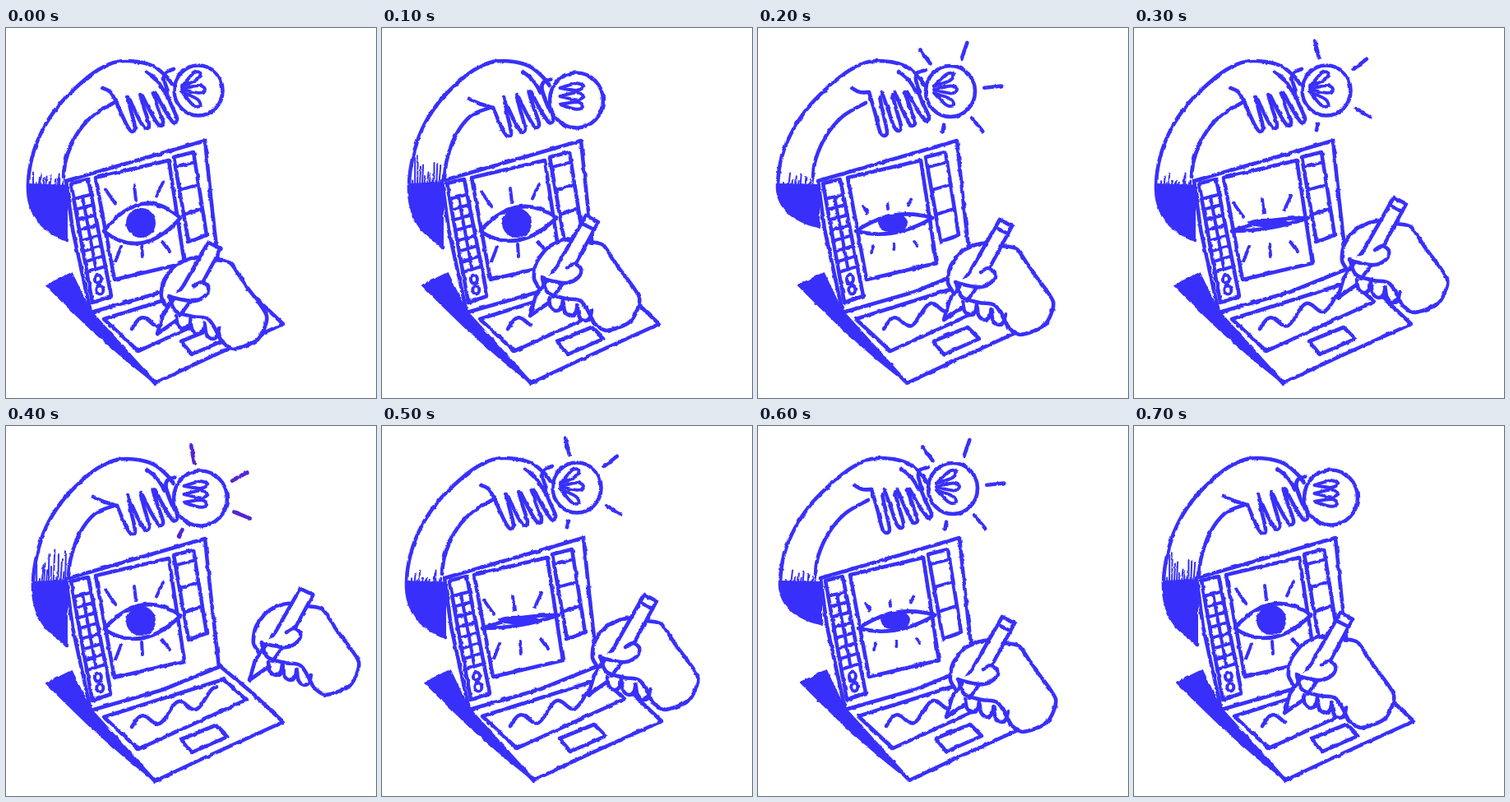
Recreate the animation shown at these times as an HTML page. Size 450 px wide and 450 px high, loop 800 ms.

```html
<!DOCTYPE html>
<html lang="en">
<head>
<meta charset="utf-8">
<title>Drawing an idea</title>
<style>
html, body { margin: 0; width: 100%; height: 100%; overflow: hidden; background: #fff; }
svg { display: block; width: 100vw; height: 100vh; }
path { fill: none; stroke: #3830fa; stroke-width: 4.6; stroke-linecap: round; stroke-linejoin: round; }
.thin { stroke-width: 4; }
.paper { fill: #fff; }
.ink { fill: #3830fa; stroke-width: 2; }
.violet { stroke: #5526d2; }
.cel { visibility: hidden; animation: show 800ms step-end infinite; }
@keyframes show {
  0% { visibility: visible; }
  12.5%, 100% { visibility: hidden; }
}
</style>
</head>
<body>
<svg id="stage" viewBox="0 0 450 450"></svg>
<script>
const r1 = n => Math.round(n * 10) / 10;
const mix = (a, b, t) => a.map((v, i) => v + (b[i] - v) * t);
const add = (p, x, y) => [p[0] + x, p[1] + y];
const pts = text => text.split(',').map(s => s.trim().split(' ').map(Number));
const polar = ([x, y], deg, r) => {
  const t = deg * Math.PI / 180;
  return [x + r * Math.cos(t), y + r * Math.sin(t)];
};
const path = (d, cls = '') => `<path class="${cls}" d="${d}"/>`;
const line = (p, cls, close = '') => path('M' + p.map(q => q.map(r1)).join('L') + close, cls);
const shape = (p, cls) => line(p, cls, 'Z');

// Smooth open stroke through the points
function curve(p, cls, pull = 1 / 6) {
  const at = i => p[Math.max(0, Math.min(p.length - 1, i))];
  let d = 'M' + p[0].map(r1);
  for (let i = 0; i < p.length - 1; i++) {
    const [a, b, c, e] = [at(i - 1), at(i), at(i + 1), at(i + 2)];
    const c1 = b.map((v, k) => v + (c[k] - a[k]) * pull);
    const c2 = c.map((v, k) => v - (e[k] - b[k]) * pull);
    d += 'C' + [...c1, ...c2, ...c].map(r1);
  }
  return path(d, cls);
}

const oval = ([x, y], rx, ry, cls) =>
  path(`M${x - rx} ${y}a${rx} ${ry} 0 1 1 ${2 * rx} 0a${rx} ${ry} 0 1 1 ${-2 * rx} 0Z`, cls);

function random(seed) {
  return () => (seed = seed * 16807 % 2147483647) / 2147483647;
}

// lean and foot bend the arm; stack and fan arrange the filament loops
const poses = [
  { id: 'a', lean: 0, foot: 258, wrist: [117, 73], knuckle: 92, reach: 126, slope: 3.6, dark: 192, hatch: 18,
    bulb: [234, 76], r: 30, stack: 3, fan: 38, rays: [-103, -38, 31, 104] },
  { id: 'c', lean: 6, foot: 267, wrist: [106, 86], knuckle: 97, reach: 132, slope: 5.5, dark: 188, hatch: 45,
    bulb: [236.5, 88], r: 33, stack: 10, fan: 4, rays: [-100, -29, 22, 120] },
  { id: 'b', lean: -3, foot: 241, wrist: [114, 73], knuckle: 78, reach: 131, slope: 6, dark: 191, hatch: 16,
    bulb: [234, 77], r: 30.5, stack: 4, fan: 32, rays: [-126, -71, -6, 51, 101] }
];
const openness = [1, .85, .45, .18, .85];
const penTips = [[184, 372], [180, 350], [226, 355], [248, 328], [296, 309]];

const outer = pts('203 70,195 59,180 47,160 41,135 41,112 51,90 68,65 93,45 123,32 156,27 190,30 215,42 237,60 251,74 258');
const inner = pts('70 181,73 160,85 131,105 107,134 92');

function arm(pose, rnd) {
  const bend = ([x, y]) => [
    x + pose.lean * Math.max(0, Math.min(1, (y - 60) / 100)) * (x < 70 || y < 190 ? 1 : 0),
    y > 190 ? 190 + (y - 190) * (pose.foot - 190) / 68 : y
  ];
  const edge = outer.map(bend);
  let s = shape([...edge.slice(-5), [74, pose.dark]], 'ink');
  for (let i = 0; i < 13; i++) {
    const x = 33 + pose.lean * .7 + i * 2.9;
    s += line([[x, pose.dark + 6], [x + 3 * rnd(), pose.dark - pose.hatch * rnd()]], 'ink');
  }
  const sleeve = inner.slice(0, -1).map(bend);
  s += curve(edge) + curve([...sleeve, [131, pose.knuckle > 95 ? 97 : 91]]);
  s += curve([pose.wrist, [pose.wrist[0] + 10, pose.wrist[1] + 5], [135, pose.knuckle]]);
  for (let i = 0; i < 4; i++) {
    const a = [135 + 15.5 * i, 78 + (pose.knuckle - 78) * (1 - i / 3)];
    const b = [148 + 15.3 * i, 84 - 3 * i];
    const tip = [153 + 17 * i, pose.reach - pose.slope * i];
    s += curve([a, add(mix(a, tip, .5), -1, 1), add(tip, -5, -6), tip, add(tip, 4, -5), add(mix(b, tip, .4), 2, 0), b]);
  }
  return s + curve(pts('171 53,183 63,193 78'));
}

function bulb({ bulb: c, r, stack, fan }) {
  let s = curve([[-30, -26], [-40, -22], [-42, -14], [-37, 1]].map(([x, y]) => add(c, x, y)));
  s += oval(c, r - .5, r + .5, 'paper');
  for (const j of [-1, 0, 1]) {
    const root = add(c, -20, j * stack - stack / 2);
    const petal = [-12, 12].map(turn => polar(root, j * fan + turn, 21));
    s += curve([root, petal[0], polar(root, j * fan, 28), petal[1], root], 'thin');
  }
  return s;
}

const rays = ({ id, bulb: c, r, rays }) => rays.map((deg, i) =>
  line([polar(c, deg, r + 11), polar(c, deg, r + (i < rays.length - 1 ? 32 : 20))], id === 'c' ? 'violet' : '')).join('');

const panel = pts('109 182,198 161,217 286,132 306');
const tools = pts('79 189,100 184,128 326,105 334');
const swatches = pts('204 157,228 151,244 252,222 260');
const spot = (q, u, v) => mix(mix(q[0], q[1], u), mix(q[3], q[2], u), v);
const rung = (q, v) => line([spot(q, 0, v), spot(q, 1, v)], 'thin');

function laptop() {
  let s = shape(pts('49 313,80 298,103 346,181 432,145 403,105 368,70 334'), 'ink');
  s += shape(pts('103 346,181 432,238 405,337 360,300 325,259 291'), 'paper');
  s += shape(pts('73 186,242 137,249 205,259 293,190 321,103 346,81 245'), 'paper');
  s += shape(panel) + shape(tools) + shape(swatches);
  for (let i = 0; i < 8; i++) s += rung(tools, .13 + i * .088);
  s += line([spot(tools, .5, .13), spot(tools, .5, .746)], 'thin');
  for (const v of [.83, .92]) s += oval(spot(tools, .5, v).map(r1), 4, 5, 'thin');
  for (const v of [.12, .39, .68]) s += rung(swatches, v);
  return s + shape(pts('119 354,265 308,292 333,161 393')) + shape(pts('213 381,255 364,269 378,226 397'));
}

function eye(open) {
  const lift = 50 * open;
  let s = path(`M119 247Q165 ${239 - lift} 212 231Q165 ${239 + lift * .9} 119 247Z`, 'paper');
  s += oval([164, 237], open < .3 ? 24 : 17, Math.min(17, 23 * open), 'ink');
  const len = Math.min(1, .4 + Math.abs(open - .45) * 2.4); // lashes shrink halfway through a blink
  for (const j of [-1, 0, 1]) {
    const top = [158 + 25 * j, 209 - 4.5 * j + 20 * (1 - open)];
    const low = [165 + 25 * j, 263 - 3 * j];
    s += line([top, add(top, (10 * j - 2) * len, -17 * len)], 'thin');
    s += line([low, add(low, (8 * j + 1) * len, (15 - 3 * j) * len)], 'thin');
  }
  return s;
}

// The scribble grows until it meets the pen
function scribble(tip) {
  const end = Math.min(1, (tip[0] - 153) / 103);
  const p = [];
  for (let i = 0; i <= 24; i++) {
    const s = end * i / 24;
    p.push([153 + 103 * s, 366 - 40 * s - 9 * Math.sin(2 * Math.PI * 2.3 * s)]);
  }
  return curve(p);
}

function hand(tip, longPen) {
  const put = text => pts(text).map(p => add(p, ...tip));
  const grip = put('32 -59,50 -53');
  const top = put('68 -122,83 -114').map((p, i) => mix(grip[i], p, longPen ? 1 : .83));
  let s = curve(put('14 -30,5 -45,8 -65,23 -84,46 -93,70 -90,89 -86,106 -61,133 -22,122 7,93 18,78 9'), 'paper', .12);
  s += shape([top[0], top[1], grip[1], ...put('23 -16,0 0,7 -24'), grip[0]], 'paper');
  if (longPen) s += line(top.map((p, i) => mix(p, grip[i], .15)));
  for (let i = 0; i < 3; i++) {
    const p = add(tip, 23 + 17.5 * i, 6 * i - 22);
    s += curve([p, add(p, 2, 11), add(p, 9, 16), add(p, 15, 12), add(p, 17, 3)], 'paper');
  }
  s += curve(put('14 -46,28 -42,45 -40,59 -47,62 -57,54 -63,45 -58'), 'paper');
  return s + curve(put('15 -45,22 -28,43 -21,63 -17,78 9'));
}

// The pen travels out and back; the way back is drawn a little aside
function cel(i) {
  const k = 4 - Math.abs(4 - i);
  const pose = poses[k % 3], tip = penTips[k];
  const art = bulb(pose) + arm(pose, random(k + 7)) + laptop() + eye(openness[k]) +
    scribble(tip) + hand(tip, k % 4 > 0) + (k > 1 ? rays(pose) : '');
  const shift = i > 4 ? '3 -1' : '0 0';
  return `<g class="cel" style="animation-delay:${i * 100 - 800}ms">` +
    `<g transform="translate(${shift})"><g filter="url(#chalk-${pose.id})">${art}</g></g></g>`;
}

const chalk = poses.map(({ id }, i) =>
  `<filter id="chalk-${id}" filterUnits="userSpaceOnUse" x="0" y="0" width="450" height="450" color-interpolation-filters="sRGB">
    <feTurbulence type="fractalNoise" baseFrequency=".12" numOctaves="3" seed="${i + 3}"/>
    <feDisplacementMap in="SourceGraphic" scale="3" xChannelSelector="R" yChannelSelector="G"/>
  </filter>`).join('');

document.getElementById('stage').innerHTML =
  `<defs>${chalk}</defs>` + Array.from({ length: 8 }, (_, i) => cel(i)).join('');
</script>
</body>
</html>
```
